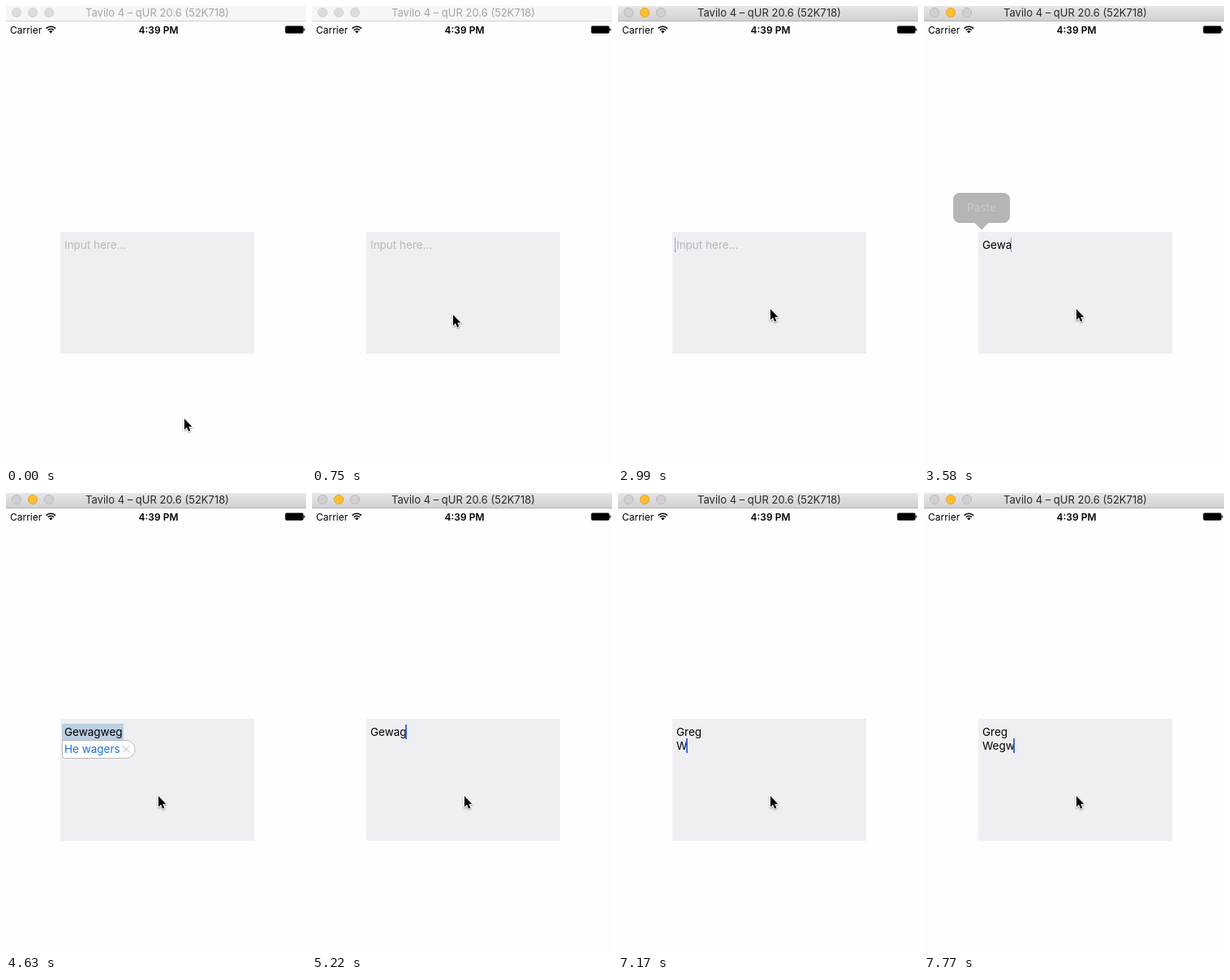
Write an HTML page with a canvas that moves like this. It is 370 px wide and 565 px high and loops after 8000 ms.

```html
<!DOCTYPE html>
<html lang="en">
<head>
<meta charset="utf-8">
<title>Text input</title>
<style>
html, body { margin: 0; width: 100%; height: 100%; overflow: hidden; background: #fefefe; }
canvas { display: block; width: 370px; height: 565px; }
</style>
</head>
<body>
<canvas id="stage"></canvas>
<script>
const W = 370, H = 565, LOOP = 8000;
const FONT = 'Inter, Roboto, "Liberation Sans", sans-serif';
const canvas = document.getElementById('stage');
const ctx = canvas.getContext('2d');
const dpr = window.devicePixelRatio || 1;
canvas.width = W * dpr;
canvas.height = H * dpr;

// Editor states: time, text, caret, suggestion, menu colours
const MENU_ON = ['#1e1e1e', '#ffffff'];
const MENU_FADING = ['#b5b5b5', '#cbcbcb'];
const EDITS = [
  [0, '', ''],
  [2990, '', 'faint'],
  [3430, '', 'faint', '', MENU_ON],
  [3580, 'Gewa', 'faint', '', MENU_FADING],
  [3730, 'Gewag', 'solid'],
  [3880, 'Gewagw', 'solid'],
  [4030, 'Gewagwe', 'solid'],
  [4180, 'Gewagwe', '', 'He wagers'],
  [4480, 'Gewagweg', 'solid'],
  [4630, 'Gewagweg', '', 'He wagers'],
  [4780, 'Gewagweg', 'solid'],
  [4930, 'Gewagwe', 'solid'],
  [5080, 'Gewag', 'solid'],
  [5230, 'Gew', 'solid'],
  [5370, 'Ge', 'solid'],
  [5520, 'G', 'solid'],
  [5670, '', 'solid'],
  [6120, 'G', 'solid'],
  [6270, 'Gre', 'solid'],
  [6570, 'Greg', 'solid'],
  [6720, 'Greg\n', 'solid'],
  [7170, 'Greg\nW', 'solid'],
  [7320, 'Greg\nWe', 'solid'],
  [7470, 'Greg\nWeg', 'solid'],
  [7620, 'Greg\nWeg', '', 'Wage'],
  [7770, 'Greg\nWegw', 'solid']
];

// Pointer positions, held until the next time
const POINTER = [
  [0, 220, 508], [300, 212, 484], [450, 194, 436], [600, 179, 394], [750, 174, 380],
  [2390, 178, 378], [2540, 185, 374], [2690, 188, 373]
];

const at = (steps, t) => steps.filter(s => s[0] <= t).pop();

function setFont(size, weight = 400) {
  ctx.font = `${weight} ${size}px ${FONT}`;
}

function text(str, x, y, color, align = 'left') {
  ctx.fillStyle = color;
  ctx.textAlign = align;
  ctx.fillText(str, x, y);
}

function box(x, y, w, h, color) {
  ctx.fillStyle = color;
  ctx.fillRect(x, y, w, h);
}

function roundBox(x, y, w, h, r) {
  ctx.beginPath();
  ctx.roundRect(x, y, w, h, r);
}

function polygon(points) {
  ctx.beginPath();
  points.forEach(([x, y]) => ctx.lineTo(x, y));
  ctx.closePath();
}

function dot(x, fill, edge) {
  ctx.beginPath();
  ctx.arc(x, 8, 5.6, 0, Math.PI * 2);
  ctx.fillStyle = fill;
  ctx.fill();
  ctx.strokeStyle = edge;
  ctx.lineWidth = 0.9;
  ctx.stroke();
}

function titleBar(active) {
  const bar = ctx.createLinearGradient(0, 0, 0, 18);
  bar.addColorStop(0, active ? '#e7e5e7' : '#f6f6f6');
  bar.addColorStop(1, active ? '#d2d0d2' : '#f6f6f6');
  box(0, 0, W, 18, bar);
  box(0, 18, W, 1, active ? '#b3b1b3' : '#d1d1d1');
  const fill = active ? '#d1cfd1' : '#dcdcdc';
  const edge = active ? '#b8b6b8' : '#d0d0d0';
  dot(13, fill, edge);
  dot(33, active ? '#fdbe2f' : fill, active ? '#dfa125' : edge);
  dot(53, fill, edge);
  setFont(13);
  text('Tavilo 4 – qUR 20.6 (52K718)', 186.5, 13, active ? '#2b292b' : '#a5a5a5', 'center');
}

function statusBar() {
  setFont(12);
  text('Carrier', 5, 33.5, '#000');
  setFont(12, 600);
  text('4:39 PM', 188, 33.5, '#000', 'center');

  ctx.strokeStyle = '#000';
  ctx.lineWidth = 1.6;
  for (const r of [5.1, 8.1]) {
    ctx.beginPath();
    ctx.arc(55.3, 33.3, r, -Math.PI * 0.75, -Math.PI * 0.25);
    ctx.stroke();
  }
  ctx.beginPath();
  ctx.moveTo(55.3, 33.6);
  ctx.arc(55.3, 33.6, 3.2, -Math.PI * 0.75, -Math.PI * 0.25);
  ctx.fillStyle = '#000';
  ctx.fill();

  roundBox(344.3, 24.6, 22.5, 9.2, 1.8);
  ctx.fill();
  roundBox(367.2, 27.5, 1.3, 3.2, 0.6);
  ctx.fill();
}

function menu([fill, ink]) {
  ctx.fillStyle = fill;
  roundBox(36, 230, 70, 37, 8);
  ctx.fill();
  polygon([[62, 266.5], [80, 266.5], [71, 275.5]]);
  ctx.fill();
  setFont(13.5);
  text('Paste', 71, 253, ink, 'center');
}

function drawCaret(kind, x, y) {
  if (kind === 'solid') {
    box(x, y, 2, 18, '#3f6be0');
  } else {
    box(x, y, 1, 18, '#8ea6ea');
    box(x + 1, y + 17, 1, 1, '#8ea6ea');
  }
}

function suggestionBubble(word, top) {
  const w = ctx.measureText(word).width;
  roundBox(69.5, top + 0.5, w + 21, 22, [0, 11, 11, 3]);
  ctx.fillStyle = '#fff';
  ctx.fill();
  ctx.strokeStyle = '#b9b9bb';
  ctx.lineWidth = 1;
  ctx.stroke();
  text(word, 72, top + 16, '#1a70d8');
  const x = 72 + w + 7.5, y = top + 11.5;
  ctx.beginPath();
  for (const s of [-1, 1]) {
    ctx.moveTo(x - 4, y - 4 * s);
    ctx.lineTo(x + 4, y + 4 * s);
  }
  ctx.strokeStyle = '#b0b0b2';
  ctx.stroke();
}

function editor([, value, caret, suggestion, menuColors]) {
  box(67, 278, 239, 150, '#efeef3');
  setFont(13.5);
  const lines = value.split('\n');
  const last = lines.length - 1;
  const top = 285 + last * 17;
  const width = ctx.measureText(lines[last]).width;

  if (suggestion) box(69, top - 1, Math.round(width + 4), 20, '#bccee1');
  if (!value) text('Input here...', 72, 299, '#b9b9bd');
  lines.forEach((line, i) => text(line, 72, 299 + i * 17, '#000'));
  if (caret) drawCaret(caret, Math.round(70.4 + width), top);
  if (suggestion) suggestionBubble(suggestion, top + 19);
  if (menuColors) menu(menuColors);
}

function pointer([, x, y]) {
  ctx.save();
  ctx.translate(x, y);
  polygon([[0, 0], [0, 13.4], [3, 10.6], [5.2, 15.4], [7.4, 14.4], [5.3, 9.7], [9.4, 9.7]]);
  ctx.lineJoin = 'round';
  ctx.lineWidth = 2;
  ctx.strokeStyle = '#fff';
  ctx.shadowColor = 'rgba(0,0,0,0.4)';
  ctx.shadowBlur = 2 * dpr;
  ctx.shadowOffsetY = dpr;
  ctx.stroke();
  ctx.shadowColor = 'transparent';
  ctx.fillStyle = '#000';
  ctx.fill();
  ctx.restore();
}

function draw() {
  const t = performance.now() % LOOP;
  ctx.setTransform(dpr, 0, 0, dpr, 0, 0);
  box(0, 0, W, H, '#fefefe');
  titleBar(t >= 1650);
  statusBar();
  editor(at(EDITS, t));
  pointer(at(POINTER, t));
  requestAnimationFrame(draw);
}
draw();
</script>
</body>
</html>
```
